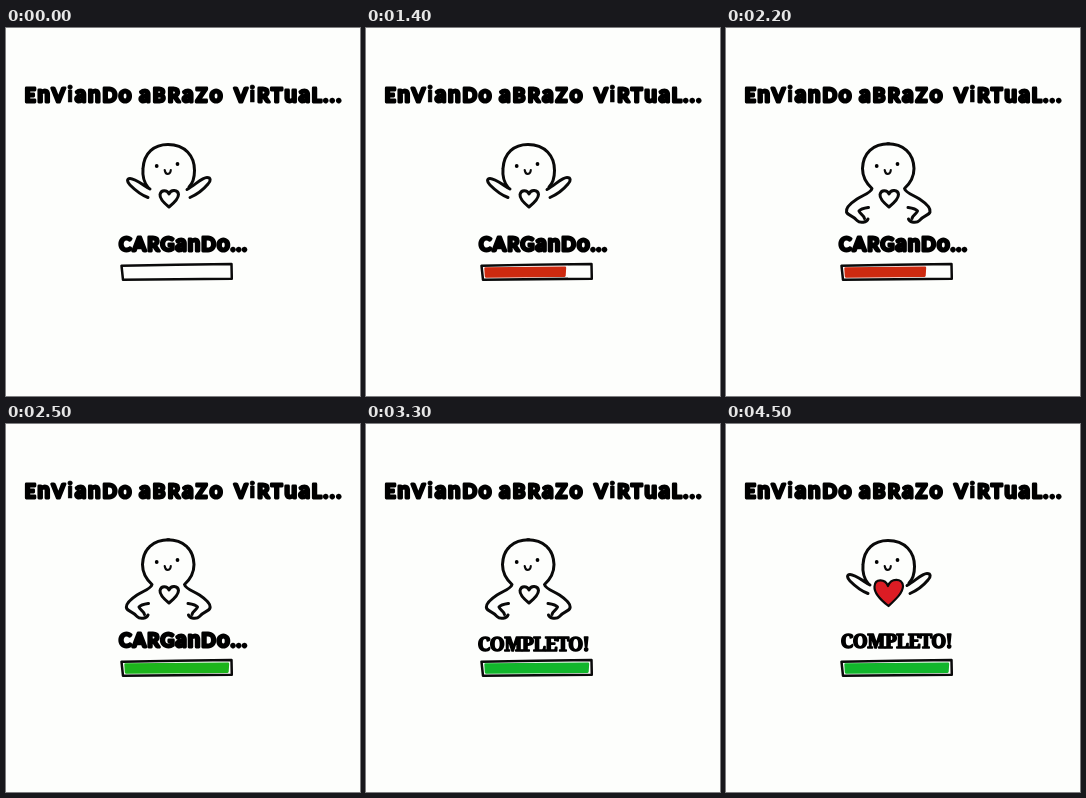
Recreate the animation shown at these times as an HTML page. Size 354 by 368 pixels, loop 4600 ms.

```html
<!DOCTYPE html>
<html lang="es">
<head>
<meta charset="utf-8">
<title>Abrazo virtual</title>
<style>
  html, body { margin: 0; width: 100%; height: 100%; overflow: hidden; background: #fdfefc; }
  svg { display: block; width: 354px; height: 368px; }
  text { text-anchor: middle; stroke: #000; stroke-linejoin: round; }
  .round { font: 700 19px Lato, "Open Sans", sans-serif; stroke-width: 2.8; }
  .low { font-size: 22px; }
  .dot { font-weight: 900; font-size: 23px; stroke-width: .7; }
  .serif { font: 700 19px "Noto Serif", "Liberation Serif", serif; letter-spacing: -.6px; stroke-width: 1.6; }
  .alert { font: 500 26px Roboto, "Liberation Sans", sans-serif; letter-spacing: -.4px; fill: #cd280d; stroke: #cd280d; stroke-width: 2.3; }
  .ink { fill: none; stroke: #0a0a0a; stroke-width: 3; stroke-linecap: round; stroke-linejoin: round; }
  .thin { stroke-width: 2.1; }
</style>
</head>
<body>
<svg viewBox="0 0 354 368">
  <g id="title"></g>

  <g id="up" class="ink">
    <path d="M142 159.500C137 153 136.500 146 137 140.500C138 125 148 116.500 162 116.500C179 116.500 188.500 128 188.500 142.500C188.500 149 187 155 183 159"/>
    <path d="M144 161C137 157 129 150.500 124 150.500C120.500 150.500 121 154 124 157C129 162 135 167 142 169.500"/>
    <path d="M181 161.500C189 157 196 149.500 201 149.500C205 149.500 205 153 202 156C197 162 192 166 184 169.500"/>
  </g>

  <g id="down" class="ink">
    <g id="side">
      <path d="M163 115.700C147 115.700 137 125 136.500 140.500C136.500 147 140 155 146 160.500C145 165 137 167 131 171C125 175 119.500 180 120.500 184C121.500 187.500 128 188 131 192.500C134 195.500 141 194.500 142 191"/>
      <path d="M142.500 179.500C139 180 135 180.500 133 183C134 186 138 187 138.500 190.500"/>
    </g>
    <use href="#side" transform="translate(324.500 0) scale(-1 1)"/>
  </g>

  <g>
    <circle cx="150.700" cy="138" r="1.900"/>
    <circle cx="171.500" cy="136" r="1.900"/>
    <path id="smile" class="ink thin" d="M158.700 142C159.500 147.500 164.500 147 164.800 142"/>
    <g id="angry" class="ink thin">
      <path d="M149.500 129L160 135"/>
      <path d="M175.500 125.500L166.500 134.500"/>
      <path d="M160.500 145C161 141 165 141 165.500 144.500"/>
    </g>
  </g>

  <path id="heart" class="ink" d="M163 179C158 175 153.500 171 154 166.500C155 161.500 161 161.500 163 166C165 161 172 161.500 172.500 166.500C172.500 171 168 175 163 179Z" stroke-width="2"/>
  <path id="love" class="ink" style="fill:#dc1c24;stroke-width:2.200" d="M162.500 182C156 177 148 169 148.500 162.500C149 154.500 159 154.500 162 162C165 153.500 176.500 154 177 162C177 169 169 176 162.500 182Z"/>

  <g id="load"></g>
  <text id="done" class="serif">COMPLETO!</text>

  <path id="fill" stroke-width="2.400" stroke-linejoin="round"/>
  <path class="ink" style="stroke-width:2.500" d="M115.500 237.700Q170 236.500 225.500 236L225.800 250.700Q170 251 117 251.800Z"/>

  <text id="error" class="alert" x="172" y="314">¡ERROR!</text>
</svg>
<script>
const LOOP = 4600;
const $ = id => document.getElementById(id);

// Unicase lettering: lowercase forms are set larger to sit near cap height.
function lettering(parent, word, x, y, gap) {
  const spans = word.replace(/i|[a-hj-z]+/g,
    s => `<tspan class="${s === 'i' ? 'dot' : 'low'}">${s}</tspan>`);
  $(parent).insertAdjacentHTML('beforeend',
    `<text class="round" x="${x}" y="${y}" style="letter-spacing:${gap}px">${spans}</text>`);
}
lettering('title', 'EnVianDo', 73, 74, 1.9);
lettering('title', 'aBRaZo', 176, 74, 2.4);
lettering('title', 'ViRTuaL...', 282.5, 74, 1.9);
lettering('load', 'CARGanDo...', 177.5, 223, 1.2);

// [time, right edge, colour]
const RED = '#cd2a10', GREEN = '#1db41c', BRIGHT = '#12b62c';
const bar = [
  [0, 0, RED], [100, 124, RED], [200, 131, RED], [300, 138, RED], [400, 145, RED],
  [600, 153, RED], [700, 161, RED], [900, 169, RED], [1100, 180, RED],
  [1200, 190, RED], [1400, 200, RED],
  [2300, 212, GREEN], [2400, 219, GREEN], [2500, 223, GREEN], [2700, 223, BRIGHT]
];

// Visible spans in ms
const spans = {
  up: [[0, 1500], [3400, LOOP]],
  down: [[1500, 3400]],
  smile: [[0, 1500], [2200, LOOP]],
  angry: [[1500, 2200]],
  error: [[1600, 2200]],
  load: [[0, 3000]],
  done: [[3000, LOOP]],
  heart: [[0, 3600]],
  love: [[3600, LOOP]]
};

function draw(t) {
  for (const id in spans) {
    const on = spans[id].some(([a, b]) => t >= a && t < b);
    $(id).style.display = on ? '' : 'none';
  }
  const [, edge, colour] = bar.filter(s => s[0] <= t).pop();
  const fill = $('fill');
  fill.setAttribute('d', edge ? `M119.5 240.500L${edge - 1} 239.700L${edge - 1.5} 247.700L120 248.500Z` : '');
  fill.setAttribute('fill', colour);
  fill.setAttribute('stroke', colour);
  const moved = t >= 3400;
  $('done').setAttribute('x', moved ? 170.5 : 167.5);
  $('done').setAttribute('y', moved ? 224 : 227);
}

const start = performance.now();
function tick() {
  draw((performance.now() - start) % LOOP);
  requestAnimationFrame(tick);
}
tick();
</script>
</body>
</html>
```
